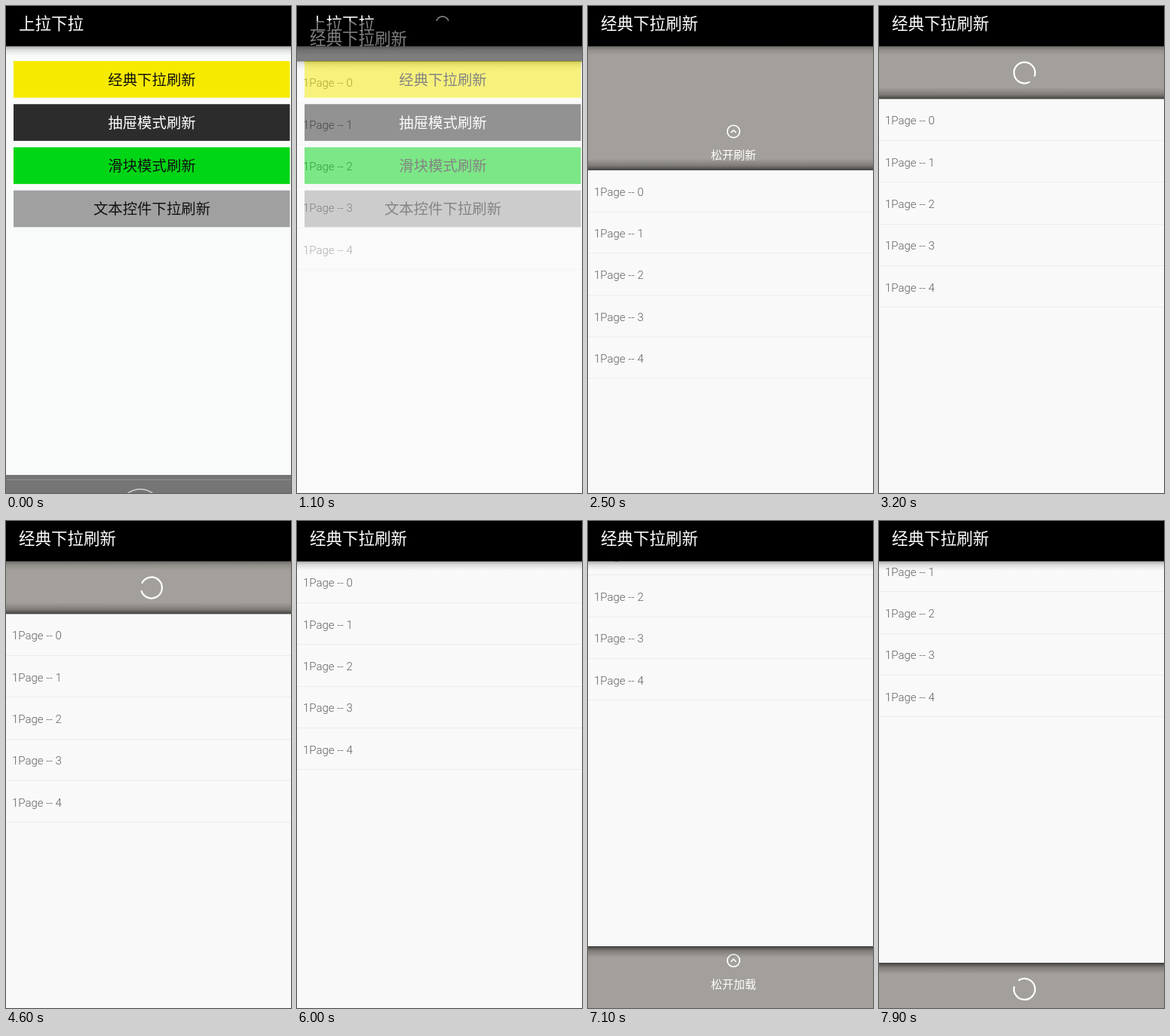
Animation, 378 px wide and 646 px high, one loop 8000 ms. Source, as an HTML page:

```html
<!DOCTYPE html>
<html lang="zh-CN">
<meta charset="utf-8">
<title>下拉刷新</title>
<style>
  html, body { margin: 0; width: 100%; height: 100%; overflow: hidden; background: #f9fbfa; }
  svg { display: block; width: 378px; height: 646px; }
  text { font-family: "Noto Sans CJK SC", "Noto Sans CJK", sans-serif; }
  .title { font-size: 21.5px; fill: #fff; }
  .button { font-size: 19.4px; text-anchor: middle; }
  .row { font: 300 15px Roboto, sans-serif; fill: #606060; }
  .hint { font-size: 15px; fill: #fff; text-anchor: middle; }
  .line { fill: none; stroke: #fff; stroke-width: 1.7; }
</style>
<svg viewBox="0 0 378 646">
  <defs>
    <linearGradient id="down" x2="0" y2="1">
      <stop stop-opacity=".62"/><stop offset=".4" stop-opacity=".22"/><stop offset="1" stop-opacity="0"/>
    </linearGradient>
    <linearGradient id="up" x2="0" y2="1">
      <stop stop-opacity="0"/><stop offset=".6" stop-opacity=".22"/><stop offset="1" stop-opacity=".62"/>
    </linearGradient>
    <g id="bar">
      <rect width="378" height="53.5"/>
      <rect y="53.5" width="378" height="12" fill="url(#down)" opacity=".5"/>
    </g>
    <path id="ring" class="line" style="stroke-width:2.2" d="M13.2 4.8A14 14 0 1 1 13.2 -4.8"/>
    <g id="arrow" class="line"><circle r="8.2"/><path d="M-3.5 1.7L0 -1.8L3.5 1.7"/></g>
  </defs>

  <g id="menu">
    <rect width="378" height="646" fill="#f9fbfa"/>
    <use href="#bar"/>
    <text class="title" x="17" y="31">上拉下拉</text>
    <g id="buttons"></g>
    <g id="nav">
      <rect y="622" width="378" height="24" fill="#757575"/>
      <rect y="628" width="378" height="1" fill="#929292"/>
      <circle cx="178" cy="669" r="28" fill="none" stroke="#d0d0d0" stroke-width="1.5"/>
    </g>
  </g>

  <g id="page">
    <rect y="53" width="378" height="646" fill="#a39f9a"/>
    <g id="scroll">
      <g id="headHint">
        <use id="headArrow" href="#arrow"/>
        <text id="headText" class="hint" x="193" y="38.7"></text>
      </g>
      <use id="headRing" href="#ring"/>
      <text id="done" class="hint" x="193" y="23.7">刷新完成</text>
      <g id="footHint">
        <use href="#arrow" x="193" y="675"/>
        <text id="footText" class="hint" x="193" y="711.5"></text>
      </g>
      <use id="footRing" href="#ring"/>
      <rect y="38" width="378" height="15.5" fill="url(#up)"/>
      <rect y="656" width="378" height="15" fill="url(#down)"/>
      <rect y="53.5" width="378" height="602.5" fill="#f9f9f9"/>
      <g id="rows"></g>
    </g>
    <use href="#bar"/>
    <text class="title" x="17" y="31">经典下拉刷新</text>
  </g>
</svg>
<script>
  const $ = id => document.getElementById(id);
  const LOOP = 8000, STEP = 100, REST = 70;

  $('buttons').innerHTML = [
    ['经典下拉刷新', '#f6eb00', '#111'],
    ['抽屉模式刷新', '#2c2c2c', '#fff'],
    ['滑块模式刷新', '#00d615', '#111'],
    ['文本控件下拉刷新', '#a0a0a0', '#111']
  ].map(([label, fill, ink], i) =>
    `<rect x="10" y="${73 + i * 57.2}" width="366.5" height="48.7" fill="${fill}"/>
     <text class="button" x="193.5" y="${105 + i * 57.1}" fill="${ink}">${label}</text>`).join('');

  $('rows').innerHTML = [0, 1, 2, 3, 4].map(i =>
    `<text class="row" x="8" y="${87.3 + i * 55.3}">1Page -- ${i}</text>
     <rect y="${108 + Math.round(i * 55.3)}" width="378" height="1" fill="#ececec"/>`).join('');

  const part = (t, from, to) => Math.min(1, Math.max(0, (t - from) / (to - from)));
  const easeOut = k => 1 - (1 - k) ** 3;
  const drag = k => Math.sin(k * Math.PI / 2);
  const show = (id, on) => $(id).setAttribute('visibility', on ? 'visible' : 'hidden');
  const move = (id, x, y, turn = 0) =>
    $(id).setAttribute('transform', `translate(${x} ${y}) rotate(${turn})`);

  // Distance pulled: follow the finger, spring back to the resting height
  const pull = (t, from, release, settled, peak) => t < release
    ? peak * drag(part(t, from, release))
    : peak + (REST - peak) * easeOut(part(t, release, settled));

  function offset(t) {
    if (t < 5700) return pull(t, 2150, 2600, 2950, 175);
    if (t < 6550) return REST * (1 - easeOut(part(t, 5700, 6000)));
    return -pull(t, 6550, 6950, 7350, 160);
  }

  function draw(t) {
    show('nav', t < 100);

    const opening = part(t, 950, 1500);
    show('page', opening > 0);
    $('page').setAttribute('opacity', part(t, 950, 1250));
    move('page', 0, 52 * (1 - easeOut(opening)));

    const y = offset(t);
    move('scroll', 0, y);

    const refreshing = t >= 2950;
    const ready = y > REST || t >= 2600;
    show('headHint', opening > 0 && !refreshing);
    $('headText').textContent = ready ? '松开刷新' : '下拉刷新';
    move('headArrow', 193, 2, ready ? 0 : 180);

    const swap = easeOut(part(t, 5200, 5600));
    show('headRing', refreshing && swap < 1);
    move('headRing', 193, 18.5 - REST * swap, 40 + (t - 3200) * .36);
    show('done', swap > 0);
    move('done', 0, REST * (1 - swap));

    const loading = t >= 7350;
    show('footHint', opening > 0 && !loading);
    $('footText').textContent = y < -REST || t >= 6950 ? '松开加载' : '上拉加载';
    show('footRing', loading);
    move('footRing', 193, 691, 215 + (t - 7900) * .36);
  }

  const start = performance.now();
  function tick() {
    const t = (performance.now() - start) % LOOP;
    draw(Math.floor(t / STEP) * STEP);
    requestAnimationFrame(tick);
  }
  tick();
</script>
</html>
```
